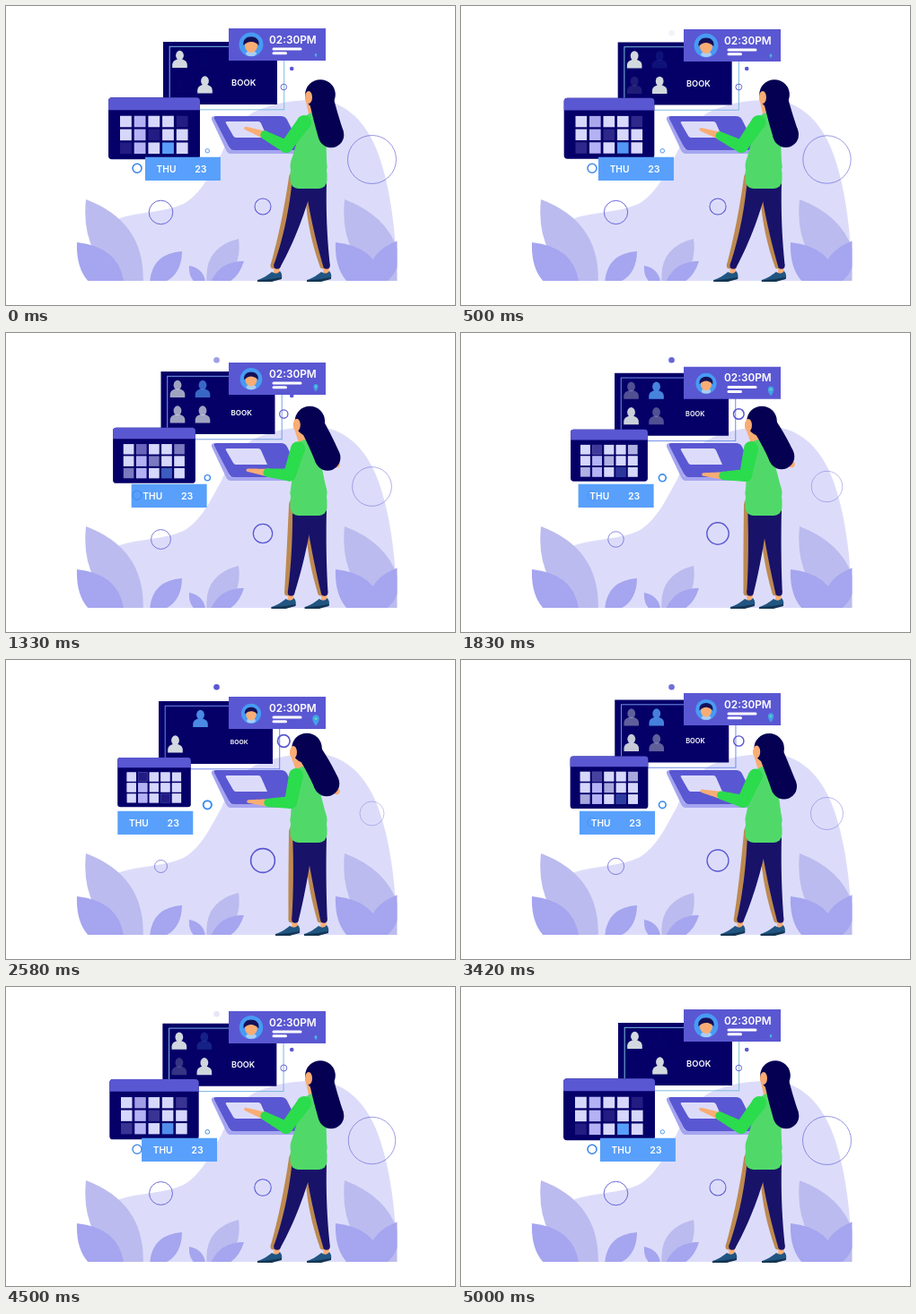
Animation, 500 px wide and 334 px high, one loop 5.08 s. Source, as an HTML page with a canvas:

```html
<!DOCTYPE html>
<html lang="en">
<head>
<meta charset="utf-8">
<title>Booking scene</title>
<style>
html, body { margin: 0; width: 100%; height: 100%; overflow: hidden; background: #fff; }
canvas { display: block; width: 500px; height: 334px; }
</style>
</head>
<body>
<canvas id="stage" width="500" height="334"></canvas>
<script>
const ctx = document.getElementById('stage').getContext('2d');
const LOOP = 5080, STEP = LOOP / 61;
const NAVY = '#050068', PURPLE = '#5a57d2', BLUE = '#58a0fb', PALE = '#dcdcfa';
const LEAF = '#a5a5f0', LEAF_BACK = '#bbbbef', SKIN = '#f9ad74', BROWN = '#bd8951';
const HAIR = '#050052', PANTS = '#181269', SHIRT = '#50d969', SLEEVE = '#2bdc4d';
const LIGHT = '#d6d7fb', LILAC = '#b4b2f4', DARK = '#211b83';
const FONT = 'Inter, "Open Sans", sans-serif';

const mix = (a, b, k) => a + (b - a) * k;
const clamp = x => Math.max(0, Math.min(1, x));
const swing = x => (1 - Math.cos(Math.PI * x)) / 2;
const between = (a, b) => [mix(a[0], b[0], .5), mix(a[1], b[1], .5)];

function fill(path, color) {
  ctx.fillStyle = color;
  ctx.fill(new Path2D(path));
}
function box(x, y, w, h, color, radius = 0) {
  ctx.fillStyle = color;
  ctx.beginPath();
  ctx.roundRect(x, y, w, h, radius);
  ctx.fill();
}
function oval(x, y, rx, ry, color) {
  ctx.fillStyle = color;
  ctx.beginPath();
  ctx.ellipse(x, y, rx, ry, 0, 0, 2 * Math.PI);
  ctx.fill();
}
const dot = (x, y, r, color) => oval(x, y, r, r, color);
function ring(x, y, r, color, width) {
  ctx.strokeStyle = color;
  ctx.lineWidth = width;
  ctx.beginPath();
  ctx.arc(x, y, r, 0, 2 * Math.PI);
  ctx.stroke();
}
function label(text, x, y, size, align = 'left') {
  ctx.font = `600 ${size}px ${FONT}`;
  ctx.textAlign = align;
  ctx.fillStyle = '#fff';
  ctx.fillText(text, x, y);
}
function faded(alpha, draw) {
  ctx.save();
  ctx.globalAlpha = clamp(alpha);
  draw();
  ctx.restore();
}
function placed(x, y, scale, draw) {
  ctx.save();
  ctx.translate(x, y);
  ctx.scale(scale, scale);
  draw();
  ctx.restore();
}

// Two arcs from tip to base, bulging equally to both sides.
function leaf(tipX, tipY, baseX, baseY, bulge, color) {
  const [mx, my] = between([tipX, tipY], [baseX, baseY]);
  const angle = Math.atan2(baseY - tipY, baseX - tipX);
  const nx = -Math.sin(angle) * bulge, ny = Math.cos(angle) * bulge;
  ctx.fillStyle = color;
  ctx.beginPath();
  ctx.moveTo(tipX, tipY);
  ctx.quadraticCurveTo(mx + nx, my + ny, baseX, baseY);
  ctx.quadraticCurveTo(mx - nx, my - ny, tipX, tipY);
  ctx.fill();
}

// Tapering round-ended band along a bent line.
function limb(color, a, b, ra, rb, bend = between(a, b)) {
  const left = [], right = [], steps = 16;
  for (let i = 0; i <= steps; i++) {
    const s = i / steps, r = mix(ra, rb, s);
    const [x, y] = [0, 1].map(n => mix(mix(a[n], bend[n], s), mix(bend[n], b[n], s), s));
    const [dx, dy] = [0, 1].map(n => mix(bend[n] - a[n], b[n] - bend[n], s));
    const len = Math.hypot(dx, dy);
    left.push([x - dy / len * r, y + dx / len * r]);
    right.unshift([x + dy / len * r, y - dx / len * r]);
  }
  ctx.fillStyle = color;
  ctx.beginPath();
  [...left, ...right].forEach(point => ctx.lineTo(...point));
  ctx.fill();
  dot(...a, ra, color);
  dot(...b, rb, color);
}

function drawGround() {
  fill('M96 307C98 270 104 243 130 236C155 229 183 230 201 219C220 206 229 184 240 165C251 140 264 120 290 113C307 107 325 105 341 105C375 103 398 128 409 152C424 183 435 240 435 307Z', PALE);
  ctx.save();
  ctx.beginPath();
  ctx.rect(0, 0, 435.5, 307);
  ctx.clip();
  for (const shift of [0, 288]) {
    leaf(89 + shift, 216, 152 + shift, 318, 46, LEAF_BACK);
    leaf(79 + shift, 264, 132 + shift, 325, 38, LEAF);
  }
  leaf(196, 274, 160, 312, 24, LEAF);
  leaf(437, 262, 405, 318, 28, LEAF);
  leaf(259, 260, 224, 312, 28, LEAF_BACK);
  leaf(265, 285, 226, 314, 18, LEAF);
  leaf(204, 290, 222, 314, 13, LEAF);
  ctx.restore();
}

function drawRings(p) {
  const q = p ** 1.4;
  faded(mix(.9, .65, p), () => ring(172.5, 230.5, mix(13.3, 7, q), PURPLE, 1));
  ring(286, 224, mix(9, 13.4, q), PURPLE, mix(1, 1.6, q));
  faded(mix(.62, .34, p), () => ring(407.5, 171.5, mix(27, 13.5, q), PURPLE, 1));
  ring(309.3, 90.5, mix(3.3, 6.8, q), PURPLE, mix(.9, 1.7, q));
  ring(224.3, 161.8, mix(2.2, 4.6, q), '#3e8eee', mix(.9, 2, q));
  dot(318.2, 70, 2.3, PURPLE);
  faded(p * 1.15, () => dot(234.5, 30.2, 3.3, PURPLE));
}

function drawPerson(x, y, color, presence) {
  faded(presence * (2 - presence), () => placed(x, y, 1, () => {
    fill('M-8.3 9.5V6C-8 2-5 .8-2.5 0H2.5C5 .8 8 2 8.3 6V9.5Z', color);
    oval(0, -4.3, 4.4, 5.4, color);
  }));
}

function drawBoard(p) {
  placed(mix(175, 170, p), mix(40, 46, p), 1, () => {
    box(0, 0, 127, 70, NAVY);
    ctx.lineWidth = 1;
    ctx.strokeStyle = `rgb(${mix(125, 108, p)},${mix(190, 130, p)},${mix(222, 235, p)})`;
    ctx.strokeRect(7.2, 5.3, 127.5, 70.5);
    drawPerson(18.5, 19.5, '#d3d9df', 1 - p);
    drawPerson(46.5, 19.5, '#4a8ae4', p);
    drawPerson(18.5, 48, '#d3d9df', p);
    drawPerson(46.5, 48, '#d3d9df', 1 - p);
    const size = mix(9.4, 6.8, p);
    label('BOOK', 89.7, 45.8 + size * .36, size, 'center');
  });
}

function drawAvatar() {
  dot(0, 0, 13.5, '#489bf3');
  oval(0, 10, 6, 3, '#a9cdf5');
  oval(0, 1.5, 7, 7.5, SKIN);
  fill('M-8.5 1C-11-12 11-12 8.5 1Q6-2 2-3Q-4-4-8.5 1Z', '#141057');
}

function drawPanel(p) {
  placed(248, mix(25, 41, p), 1, () => {
    box(0, 0, 108, 36, PURPLE);
    placed(25, mix(18, 18.8, p), mix(1, .82, p), drawAvatar);
    label('02:30PM', 45, 16.5, 11.8);
    box(48.5, 21.4, 33, 3, '#fff', 1.5);
    box(48.5, 26.3, 16.5, 3, '#fff', 1.5);
    placed(97, mix(30, 26.3, p), mix(.35, 1, p), () => {
      fill('M0 6.5C-6-1-4-6 0-6C4-6 6-1 0 6.5Z', '#43a2e7');
      dot(0, -1.8, 1.6, '#65d0bd');
    });
  });
}

function dayShade(day, darkDays, blueDay) {
  if (day === blueDay) return BLUE;
  if (darkDays.includes(day)) return DARK;
  return day % 5 === 1 ? LILAC : LIGHT;
}

function drawCalendar(p) {
  placed(165, 136.7, mix(1, .8, p), () => {
    box(-51, -34.5, 102, 69, NAVY, 4);
    box(-51, -34.5, 102, 14, PURPLE, [4, 4, 0, 0]);
    for (let day = 0; day < 15; day++) {
      const x = -38 + day % 5 * 15.7, y = -14 + Math.floor(day / 5) * 14.9;
      box(x, y, 12.8, 12.6, dayShade(day, [4, 7, 10], 13));
      faded(p, () => box(x, y, 12.8, 12.6, dayShade(day, [1, 13])));
    }
  });
}

function drawDate(p) {
  const x = mix(155, 124.3, p);
  box(x, 168.7, 84, 26.3, BLUE);
  faded(1 - p, () => ring(146, 181.2, 5, '#347fe5', 1.5));
  label('THU', x + 12.7, 185.8, 10.2);
  label('23', x + 55.3, 185.8, 10.6);
}

function drawTablet() {
  fill('M233 123L249 160H327V162Q326 165 321 165H250Q247 165 245 161L229 127Q228 123 233 123Z', LEAF);
  fill('M234 123H306Q311 123 313 127L328 157Q329 161 324 161H254Q250 161 248 157L232 126Q231 123 234 123Z', PURPLE);
  fill('M246 129H281Q283 129 284 131L291 147H256Q254 147 253 145L245 131Q244 129 246 129Z', PALE);
}

function drawLeg(hip, knee, ankle, sideOffset) {
  const [side, sideKnee] = [[hip[0] - sideOffset, hip[1]], [knee[0] - 9, knee[1]]];
  limb(SKIN, ankle, [ankle[0] - 1, 300], 3.3, 3);
  limb(BROWN, side, [ankle[0] - 4, ankle[1]], 8, 3.5, sideKnee);
  limb(PANTS, hip, ankle, 12, 3.8, knee);
  placed(ankle[0] - 19, 297, 1, () => {
    fill('M-3 9C4 7 8 4 13 0Q19 4 22-1Q25 2 24 7Q18 9 13 10.5H-3Z', '#205582');
    fill('M-3 9.5Q10 9 24 6V8Q16 10 13 11H-3Z', '#143552');
  });
}

function drawWoman(k) {
  const joint = (x, y, dx = 0, dy = 0) => [x + dx * k, y + dy * k];
  const chest = joint(343, 132, -10.5), hips = joint(337, 179);
  const shoulder = joint(332, 130, -9, -1), elbow = joint(312, 157, 5, 2);
  const wrist = joint(288, 144, 4, 15.5), finger = joint(267, 136.5, 3, 21.5);
  const crown = joint(350, 99, -15, -.5), curls = joint(362, 144, -5, -6);
  const face = joint(337, 102, -17, 1);

  dot(368, 146.5, 3.8, SKIN);
  drawLeg(joint(345, 198), joint(348, 245), joint(357, 290, -3), 4);
  drawLeg(joint(331, 192), joint(322, 245, 7), joint(302, 290, 20), 8);

  limb(SKIN, face, joint(342, 120, -15), 4, 5);
  limb(SHIRT, chest, hips, 13, 20.5);
  box(316.5, 178, 41, 26, SHIRT, 9);
  limb(SKIN, wrist, finger, 4.2, 1.8);
  limb(SLEEVE, shoulder, elbow, 8, 7);
  limb(SLEEVE, elbow, wrist, 7, 4.7);

  dot(...crown, 16.8, HAIR);
  limb(HAIR, crown, curls, 13.5, 14.3, joint(355, 122, -7, -4));
  oval(...face, 4, 7, SKIN);
}

function draw(now) {
  const step = Math.floor((now % LOOP + 8) / STEP);
  const p = swing((step - 1) / 30);
  const pose = swing(clamp((1960 - Math.abs(step * STEP - 2205)) / 1585));
  ctx.fillStyle = '#fff';
  ctx.fillRect(0, 0, 500, 334);
  drawGround();
  drawBoard(p);
  drawRings(p);
  drawPanel(p);
  drawCalendar(p);
  drawDate(p);
  drawTablet();
  drawWoman(pose);
}

let start;
function tick(now) {
  start ??= now;
  draw(now - start);
  requestAnimationFrame(tick);
}
requestAnimationFrame(tick);
</script>
</body>
</html>
```
